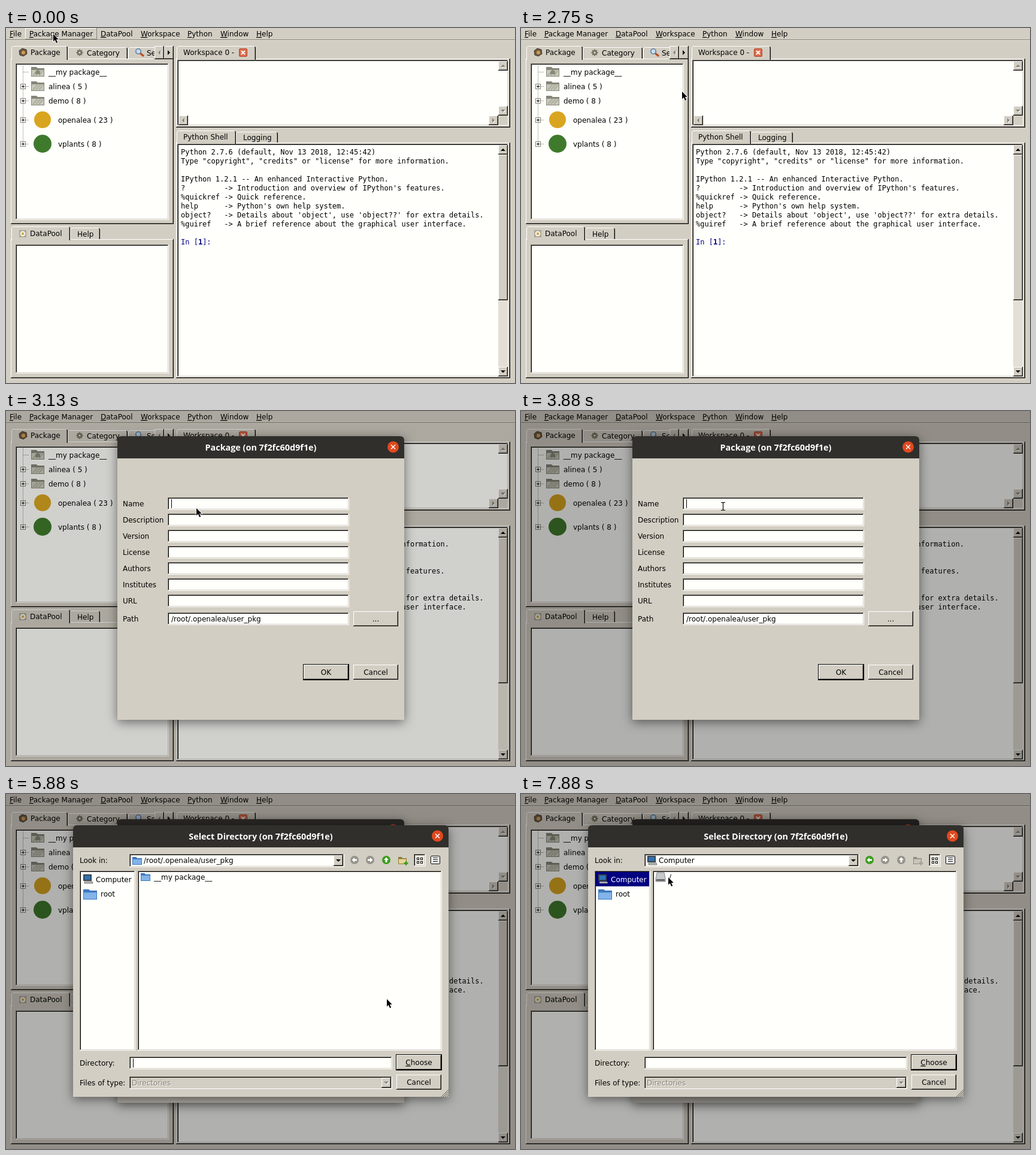
These frames come from a looping animation (850 px wide and 592 px high, 8000 ms). An HTML page:

```html
<!DOCTYPE html>
<html lang="en">
<head>
<meta charset="utf-8">
<title>Package dialog</title>
<style>
html, body { margin: 0; width: 100%; height: 100%; overflow: hidden; background: #d3cec3; }
svg { display: block; }
text { font: 12px "DejaVu Sans", sans-serif; white-space: pre; }
.mono { font-family: "DejaVu Sans Mono", monospace; }
.title { font: bold 14.4px "Open Sans", sans-serif; }
.mid { text-anchor: middle; }
.u { text-decoration: underline; }
rect { shape-rendering: crispEdges; }
.shadow { filter: drop-shadow(0 4px 9px rgba(0, 0, 0, .5)); }
</style>
</head>
<body>
<svg id="stage" width="850" height="592" viewBox="0 0 850 592"></svg>
<script>
const BG = '#d3cec3', PAPER = '#fffffb', DARK = '#87837a', NAVY = '#000080', INK = '#000';
const HOST = '7f2fc60d9f1e';

// ---- drawing helpers, all returning markup ----
const box = (x, y, w, h, fill = BG) =>
  `<rect x="${x}" y="${y}" width="${w}" height="${h}" fill="${fill}"/>`;
const path = (d, fill, more = '') => `<path d="${d}" fill="${fill}" ${more}/>`;
const disc = (x, y, r, fill) => `<circle cx="${x}" cy="${y}" r="${r}" fill="${fill}"/>`;
const group = (id, body) => `<g id="${id}">${body}</g>`;

// "&" marks the underlined mnemonic
const text = (x, y, s, cls = '', fill = INK) =>
  `<text x="${x}" y="${y}" class="${cls}" fill="${fill}">` +
  s.replace(/&(\w)/, '<tspan class="u">$1</tspan>') + '</text>';

const edge = (x, y, w, h, tl, br) =>
  (tl ? box(x, y, w, 1, tl) + box(x, y, 1, h, tl) : '') +
  (br ? box(x, y + h - 1, w, 1, br) + box(x + w - 1, y, 1, h, br) : '');
const raised = (x, y, w, h) => box(x, y, w, h) +
  edge(x, y, w, h, '#fff', INK) + edge(x + 1, y + 1, w - 2, h - 2, '', DARK);
const sunken = (x, y, w, h, fill = PAPER) => box(x, y, w, h, fill) +
  edge(x, y, w, h, DARK, '#fff') + edge(x + 1, y + 1, w - 2, h - 2, INK, BG);

const tab = (x, y, w, bottom) => {
  const h = bottom - y;
  return box(x, y, w, h) + box(x, y + 2, 1, h - 2, '#fff') + box(x + 2, y, w - 4, 1, '#fff') +
    box(x + 1, y + 1, 1, 1, '#fff') + box(x + w - 2, y + 2, 1, h - 2, DARK) +
    box(x + w - 1, y + 2, 1, h - 2, INK) + box(x + w - 2, y + 1, 1, 1, INK);
};
const turn = { up: 0, right: 90, down: 180, left: 270 };
const wedge = (x, y, dir, fill = INK, s = 4) =>
  `<path transform="translate(${x} ${y}) rotate(${turn[dir]})" d="M${-s} 2L0 -2L${s} 2Z" fill="${fill}"/>`;
const arrowBtn = (x, y, w, h, dir, off) => {
  const cx = x + w / 2, cy = y + h / 2;
  return raised(x, y, w, h) +
    (off ? wedge(cx + 1, cy + 1, dir, '#fff') : '') + wedge(cx, cy, dir, off ? DARK : INK);
};
const button = (x, y, w, h, label, main) =>
  (main ? box(x, y, w, h, INK) + raised(x + 1, y + 1, w - 2, h - 2) : raised(x, y, w, h)) +
  text(x + w / 2, y + h / 2 + 4.5, label, 'mid');

const folder = (x, y, w, h, light, deep) =>
  path(`M${x} ${y + h}V${y + 1}H${x + w * .4}L${x + w * .5} ${y + 3}H${x + w}V${y + h}Z`, deep) +
  path(`M${x + 1} ${y + h - 1}V${y + h * .35}H${x + w - 1}V${y + h - 1}Z`, light);
const blueFolder = (x, y, w, h) => folder(x, y, w, h, '#82b4ea', '#3d78bd');
const grayFolder = y => folder(42, y - 9, 22, 17, '#c9c9bb', '#85857a') +
  path(`M45 ${y + 6}l8 -9m-3 9l8 -9m-3 9l7 -8`, 'none', 'stroke="#adae9f" stroke-width="2"');
const computer = (x, y) => box(x, y, 14, 11, '#39434b') + box(x + 2, y + 2, 10, 7, '#2f72b5') +
  path(`M${x + 2} ${y + 12}h13l1 3h-14z`, '#b9bcb8', 'stroke="#555" stroke-width=".7"');

// ---- main window ----
const menuNames = [[6, '&File'], [39, '&Package Manager'], [158, '&DataPool'],
  [225, '&Workspace'], [303, '&Python'], [358, '&Window'], [418, '&Help']];

function menuBar() {
  return box(0, 19, 850, 1, DARK) + box(0, 20, 850, 1, '#e6e2d8') +
    menuNames.map(([x, s], i) => i === 1 ? '' : text(x, 14, s)).join('') +
    group('hover', edge(32, 0, 120, 19, '#fff', DARK)) +
    group('pressed', edge(32, 0, 120, 19, DARK, '#fff')) +
    group('menuLabel', text(39, 14, menuNames[1][1]));
}

function gear(x, y, c) {
  return disc(x, y, 4.5, c) + disc(x, y, 2, BG) +
    path(`M${x - 6} ${y}h12M${x} ${y - 6}v12M${x - 4} ${y - 4}l8 8m0 -8l-8 8`, 'none',
      `stroke="${c}" stroke-width="1.4"`) + disc(x, y, 1.5, '#e9e4d4');
}

function packagePanel() {
  const rows = [[73, 71, '__my package__'], [97, 71, 'alinea ( 5 )'], [121, 71, 'demo ( 8 )'],
    [153, 87, 'openalea ( 23 )'], [193, 87, 'vplants ( 8 )']];
  const dots = d => path(d, 'none', 'stroke="#87837a" stroke-dasharray="1 1"');
  const tree = rows.map(([y, x, s], i) => dots(`M29 ${y + .5}h9`) + (i ? box(24, y - 4, 9, 9, DARK) +
    box(25, y - 3, 7, 7, PAPER) + box(26, y, 5, 1, INK) + box(28, y - 2, 1, 5, INK) : '') +
    (i < 3 ? grayFolder(y) : '') + text(x, y + 5, s));
  return tab(103, 32, 100, 52) + tab(204, 32, 76, 52) + raised(8, 51, 272, 276) + tab(9, 30, 94, 53) +
    path('M22 38l5 -4l7 2l1 7l-6 4l-6 -2z', '#6b5a42', 'stroke="#3f3729"') + disc(29, 41, 3, '#d49a55') +
    text(41, 45, 'Package') + gear(123, 41, '#777463') + text(135, 46, 'Category') +
    path('M224 42l6 5', 'none', 'stroke="#bd4a1e" stroke-width="3"') +
    disc(221, 39, 5, '#5c7ca3') + disc(221, 39, 3.4, '#c7def2') + text(235, 46, 'Search') +
    arrowBtn(248, 30, 16, 22, 'left', true) + arrowBtn(264, 30, 16, 22, 'right') +
    sunken(16, 59, 256, 261) + dots('M28.5 62V193') + tree.join('') +
    path('M49 73l4 -4l4 4v4h-8z', '#858b78') + disc(61, 153, 14, '#d9a520') + disc(61, 193, 15, '#3f7a2c');
}

function dataPanel() {
  return tab(107, 333, 50, 354) + raised(8, 352, 272, 232) + tab(9, 331, 98, 354) +
    box(22, 337, 12, 12, '#a9a596') + disc(28, 343, 4.5, '#f1eee2') + disc(28, 343, 2, '#d49b2d') +
    text(40, 347, 'DataPool') + text(119, 348, 'Help') + sunken(16, 361, 256, 215);
}

function workspacePanel() {
  return raised(284, 51, 558, 115) + tab(285, 30, 132, 53) + text(296, 45, 'Workspace 0 -') +
    '<rect x="389.5" y="34.500" width="13" height="13" rx="2" fill="#dd6c4b" stroke="#b2452a"/>' +
    path('M393 38l6 6m0 -6l-6 6', 'none', 'stroke="#fff" stroke-width="2"') +
    sunken(286, 53, 553, 110) + arrowBtn(822, 55, 16, 16, 'up', true) +
    arrowBtn(822, 130, 16, 16, 'down', true) + arrowBtn(288, 146, 16, 16, 'left', true) +
    arrowBtn(806, 146, 16, 16, 'right', true) + box(822, 146, 16, 16);
}

function shellPanel() {
  const lines = ['Python 2.7.6 (default, Nov 13 2018, 12:45:42)',
    'Type "copyright", "credits" or "license" for more information.', '',
    'IPython 1.2.1 -- An enhanced Interactive Python.',
    '?         -> Introduction and overview of IPython\'s features.',
    '%quickref -> Quick reference.', 'help      -> Python\'s own help system.',
    'object?   -> Details about \'object\', use \'object??\' for extra details.',
    '%guiref   -> A brief reference about the graphical user interface.'];
  return tab(384, 173, 70, 193) + raised(284, 191, 558, 393) + tab(285, 171, 99, 194) +
    text(296, 186, 'Python Shell') + text(396, 187, 'Logging') + sunken(286, 193, 553, 389) +
    lines.map((s, i) => text(292, 211 + 15 * i, s, 'mono')).join('') +
    text(292, 361, 'In [<tspan font-weight="bold">1</tspan>]:', 'mono', NAVY) +
    box(822, 195, 16, 386, 'url(#mesh)') + arrowBtn(822, 195, 16, 16, 'up') +
    raised(822, 211, 16, 243) + arrowBtn(822, 565, 16, 16, 'down');
}

// ---- menus ----
const items = [[22, '&Load Package/Directory'], [43, '&Reload All packages'], [64, '&Find Node'],
  [94, '&Add'], [124, 'Show log']];
const subItems = ['Package', 'Composite Node', 'Python Node', 'Data File'];
const rule = y => box(37, y, 207, 1, DARK) + box(37, y + 1, 207, 1, '#fff');

const menu = () => raised(32, 18, 218, 130) + rule(88) + rule(118) +
  items.map(([y, s], i) => group('item' + i, box(35, y, 211, 21, NAVY)) +
    group('label' + i, text(52, y + 15, s, '', 'inherit') +
      (i === 2 ? text(194, y + 15, 'Ctrl+F', '', 'inherit') : '') +
      (i === 3 ? wedge(235, y + 10, 'right', 'inherit') : ''))).join('');
const subMenu = () => raised(246, 94, 138, 92) + group('subHover', box(249, 98, 132, 21, NAVY)) +
  subItems.map((s, i) => group('sub' + i, text(266, 113 + 21 * i, s, '', 'inherit'))).join('');

// ---- dialogs ----
const frame = (x, y, w, h, title) => {
  const top = `M${x} ${y + 37}v-30q0 -7 7 -7h${w - 14}q7 0 7 7v30z`;
  const cx = x + w - 18.500, cy = y + 18;
  return `<g class="shadow">${path(top, '#302f2b')}${box(x, y + 37, w, h - 37)}</g>` +
    text(x + w / 2, y + 24, `${title} (on ${HOST})`, 'title mid', '#fff') + disc(cx, cy, 9.5, '#e0491f') +
    path(`M${cx - 3.5} ${cy - 3.5}l7 7m0 -7l-7 7`, 'none', 'stroke="#fff" stroke-width="1.5"');
};

const fieldTops = [144, 171, 198, 225, 252, 279, 306, 336];
function packageDialog() {
  const names = ['Name', 'Description', 'Version', 'License', 'Authors', 'Institutes', 'URL', 'Path'];
  return frame(186, 42, 479, 473, 'Package') +
    names.map((s, i) => text(195, fieldTops[i] + 15, s) + sunken(270, fieldTops[i], 303, 21)).join('') +
    text(276, 351, '/root/.openalea/user_pkg') + group('caret1', box(276, 147, 1, 15, INK)) +
    button(580, 334, 75, 25, '...') + button(496, 422, 77, 27, 'OK', true) +
    button(580, 423, 75, 25, 'Cancel');
}

const roundArrow = (x, dir, on) => disc(x, 110, 7, on ? '#3d9c1f' : '#96938b') +
  `<path transform="translate(${x} 110) rotate(${turn[dir]})" d="M0 -4.500L4 0H1.5V4H-1.5V0H-4Z" fill="#fff"/>`;
const newFolder = on => folder(655, 104, 14, 13, on ? '#e5d795' : '#c9c5ba', on ? '#8a7b36' : '#8f8c84') +
  path('M668 112v7m-3.500 -3.500h7', 'none', `stroke="${on ? '#3d9c1f' : '#a7a49b'}" stroke-width="2.5"`);

function directoryDialog() {
  const cells = [686, 692].map(x => box(x, 106, 4, 4, INK) + box(x, 112, 4, 4, INK) +
    box(x + 1, 107, 2, 2, '#fff') + box(x + 1, 113, 2, 2, '#fff')).join('');
  const grip = [3, 6, 9, 12].map(d => `M${739 - d} 505l${d} ${-d}`).join('');
  const home = roundArrow(582, 'left', false) + roundArrow(635, 'up', true) + newFolder(true) +
    blueFolder(211, 104, 16, 14) + text(230, 115, '/root/.openalea/user_pkg') +
    computer(129, 134) + text(150, 147, 'Computer') +
    blueFolder(225, 131, 16, 14) + text(247, 143, '__my package__');
  const drives = roundArrow(582, 'left', true) + roundArrow(635, 'up', false) + newFolder(false) +
    computer(211, 103) + text(230, 115, 'Computer') + box(125, 130, 89, 24, NAVY) +
    computer(129, 134) + text(150, 147, 'Computer', '', '#fff') +
    path('M227 131h12l2 10v5h-16v-5z', '#c6c8cb', 'stroke="#85888c"') +
    box(226, 142, 14, 3, '#62656a') + text(247, 143, '/');
  return frame(112, 52, 627, 453, 'Select Directory') + text(123, 115, 'Look in:') +
    sunken(206, 100, 359, 22) + arrowBtn(547, 102, 16, 18, 'down') + roundArrow(608, 'right', false) +
    sunken(681, 100, 20, 21, '#ebe8df') + cells +
    '<rect x="709.5" y="103.500" width="15" height="13" rx="2" fill="#fff" stroke="#000"/>' +
    [106, 109, 112].map(y => box(713, y, 8, 1, INK)).join('') +
    sunken(123, 128, 93, 300) + sunken(220, 128, 508, 300) +
    group('home', home) + group('drives', drives) +
    blueFolder(129, 158, 23, 18) + text(158, 171, 'root') +
    text(123, 453, 'Directory:') + sunken(206, 438, 439, 21) + group('caret2', box(212, 441, 1, 15, INK)) +
    text(123, 486, 'Files of type:') + sunken(206, 471, 439, 21, BG) +
    text(211, 487, 'Directories', '', '#fff') + text(210, 486, 'Directories', '', DARK) +
    arrowBtn(627, 473, 16, 17, 'down', true) +
    button(651, 434, 77, 27, '&Choose', true) + button(652, 468, 75, 25, 'Cancel') +
    path(grip, 'none', 'stroke="#5f5c55"');
}

const arrowShape = 'M0 0V12.5L2.8 9.8L5.1 15L7.2 14L4.9 9H8.700Z';
const cursor = () =>
  group('arrow', path(arrowShape, '#000', 'stroke="#fff" stroke-width="1.6" paint-order="stroke"')) +
  group('beam', path('M-3 -6.500H-.5L.5 -5.500L1.5 -6.500H4M.5 -6V6M-3 6.500H-.5L.5 5.500L1.5 6.500H4', 'none',
    'stroke="#000" stroke-width="1.2"'));

const stage = document.getElementById('stage');
stage.innerHTML = `<defs><pattern id="mesh" width="2" height="2" patternUnits="userSpaceOnUse">
  ${box(0, 0, 2, 2, '#f3f0e8')}${box(0, 0, 1, 1)}${box(1, 1, 1, 1)}</pattern></defs>` +
  box(0, 0, 850, 592) + menuBar() + packagePanel() + dataPanel() + workspacePanel() + shellPanel() +
  group('menu', menu()) + group('subMenu', subMenu()) +
  group('dim1', box(0, 0, 850, 592, INK)) + group('dialog1', packageDialog() +
    group('dim2', path('M186 515V49q0 -7 7 -7h465q7 0 7 7v466z', INK))) +
  group('dialog2', directoryDialog()) + group('cursor', cursor());

// ---- motion, on a clock of 8 ticks per second ----
const el = {};
stage.querySelectorAll('g[id]').forEach(g => el[g.id] = g);
const show = (id, on) => el[id].setAttribute('display', on ? 'inline' : 'none');
const set = (id, name, value) => el[id].setAttribute(name, value);

const TICK = 125, LOOP = 8000;
const MENU = 6, SUB = 14, CLOSE = 22, DIALOG = 24, BROWSE = 46, PICK = 58;
const route = [[7, 79, 10], [12, 113, 97], [13, 113, 97], [17, 269, 106], [23, 269, 106],
  [25, 318, 162], [31, 337, 159], [35, 337, 159], [42, 503, 381], [44, 620, 347],
  [47, 636, 342], [49, 636, 342], [56, 172, 142], [58, 172, 142], [63, 246, 139]];

function pointer(k) {
  const i = route.findIndex(p => p[0] >= k);
  if (i <= 0) return route[0].slice(1);
  const [a, ax, ay] = route[i - 1], [b, bx, by] = route[i];
  const u = (k - a) / (b - a), e = u * u * (3 - 2 * u);
  return [Math.round(ax + (bx - ax) * e), Math.round(ay + (by - ay) * e)];
}
const dim = n => n < 0 ? 0 : .31 * Math.min(1, (n + .5) / 2.5);
const blink = n => n % 8 < 5;

function draw(ms) {
  const k = Math.floor(ms % LOOP / TICK);
  const [x, y] = pointer(k);
  const open = k >= MENU && k < CLOSE, sub = open && k >= SUB;

  show('hover', k < MENU);
  show('pressed', open);
  set('menuLabel', 'transform', open ? 'translate(1 1)' : '');
  show('menu', open);
  show('subMenu', sub);
  items.forEach(([top], i) => {
    const on = sub ? i === 3 : y >= top && y < top + 21;
    show('item' + i, on);
    set('label' + i, 'fill', on ? '#fff' : INK);
  });
  const inSub = sub && x > 248;
  show('subHover', inSub);
  subItems.forEach((s, i) => set('sub' + i, 'fill', inSub && i === 0 ? '#fff' : INK));

  set('dim1', 'opacity', dim(k - DIALOG));
  show('dialog1', k >= DIALOG);
  set('dialog1', 'opacity', k === DIALOG ? .6 : 1);
  show('caret1', blink(k + 1));
  set('dim2', 'opacity', dim(k - BROWSE));
  show('dialog2', k >= BROWSE);
  set('dialog2', 'opacity', k === BROWSE ? .6 : 1);
  show('caret2', k <= PICK && blink(k - BROWSE));
  show('home', k < PICK);
  show('drives', k >= PICK);

  const beam = k > DIALOG + 1 && k < BROWSE && x > 270 && x < 573 &&
    fieldTops.some(top => y >= top && y < top + 21);
  show('beam', beam);
  show('arrow', !beam);
  set('cursor', 'transform', `translate(${x} ${y})`);
}

function loop() {
  draw(performance.now());
  requestAnimationFrame(loop);
}
loop();
</script>
</body>
</html>
```
